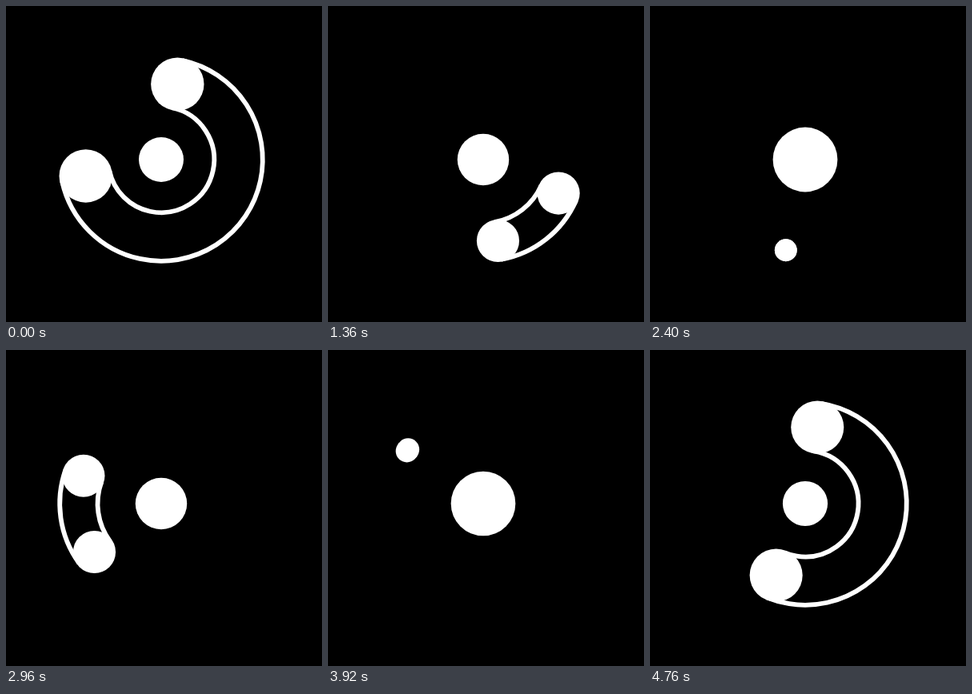
Write an HTML page with a canvas that moves like this. It is 395 px wide and 395 px high and loops after 4.8 s.

```html
<!DOCTYPE html>
<html>
<head>
<meta charset="utf-8">
<style>
  html, body { margin: 0; width: 100%; height: 100%; overflow: hidden; background: #000; }
  canvas { display: block; }
</style>
</head>
<body>
<canvas id="stage" width="395" height="395"></canvas>
<script>
const ctx = document.getElementById('stage').getContext('2d');
const CX = 194, CY = 192, RIM = 129.7, LINE = 5.8;
const BEAT = 1600, LOOP = 4800, MAX_SPAN = 245;

// Cubic Bézier easing, solved by bisection
function bezier(x1, y1, x2, y2) {
  const at = (s, a, b) => 3 * (1 - s) ** 2 * s * a + 3 * (1 - s) * s * s * b + s ** 3;
  return x => {
    let lo = 0, hi = 1;
    for (let i = 0; i < 24; i++) {
      const mid = (lo + hi) / 2;
      if (at(mid, x1, x2) < x) lo = mid; else hi = mid;
    }
    return at(hi, y1, y2);
  };
}
const growSpan = bezier(0.747, 0, 0.858, 0.35);
const growSize = bezier(0.65, 0, 0.68, 1);
const catchUp = bezier(0.046, 0, 0.113, 1);
const settle = bezier(0.165, 0.8, 0.44, 1);

const radians = deg => (deg - 90) * Math.PI / 180;

function disc(x, y, r) {
  ctx.beginPath();
  ctx.arc(x, y, r, 0, 2 * Math.PI);
  ctx.fill();
}

function band(radius, from, to, width, color) {
  ctx.beginPath();
  ctx.arc(CX, CY, radius, from, to);
  ctx.lineWidth = width;
  ctx.strokeStyle = color;
  ctx.stroke();
}

function draw(time) {
  const beats = (time % LOOP) / BEAT;
  const phase = beats % 1;
  const base = 12 + 120 * beats;
  let tail, head, size;

  if (phase < 0.5) {
    const x = phase * 2, caught = catchUp(x);
    tail = base - 360 * (1 - caught);
    head = base - (360 - MAX_SPAN) * (1 - settle(x));
    size = 1 - caught;
  } else {
    const x = phase * 2 - 1;
    tail = base;
    head = base + MAX_SPAN * growSpan(x);
    size = growSize(x);
  }

  const r = 13.9 + 19.3 * size;
  const orbit = RIM - r;
  const from = radians(tail), to = radians(head);

  ctx.fillStyle = '#000';
  ctx.fillRect(0, 0, 395, 395);
  band(orbit, from, to, 2 * r, '#fff');
  band(orbit, from, to, 2 * (r - LINE), '#000');
  ctx.fillStyle = '#fff';
  for (const a of [from, to]) disc(CX + orbit * Math.cos(a), CY + orbit * Math.sin(a), r);
  disc(CX, CY, 40.4 - 12.4 * size);
}

const start = performance.now();
function tick() {
  draw(performance.now() - start);
  requestAnimationFrame(tick);
}
tick();
</script>
</body>
</html>
```
